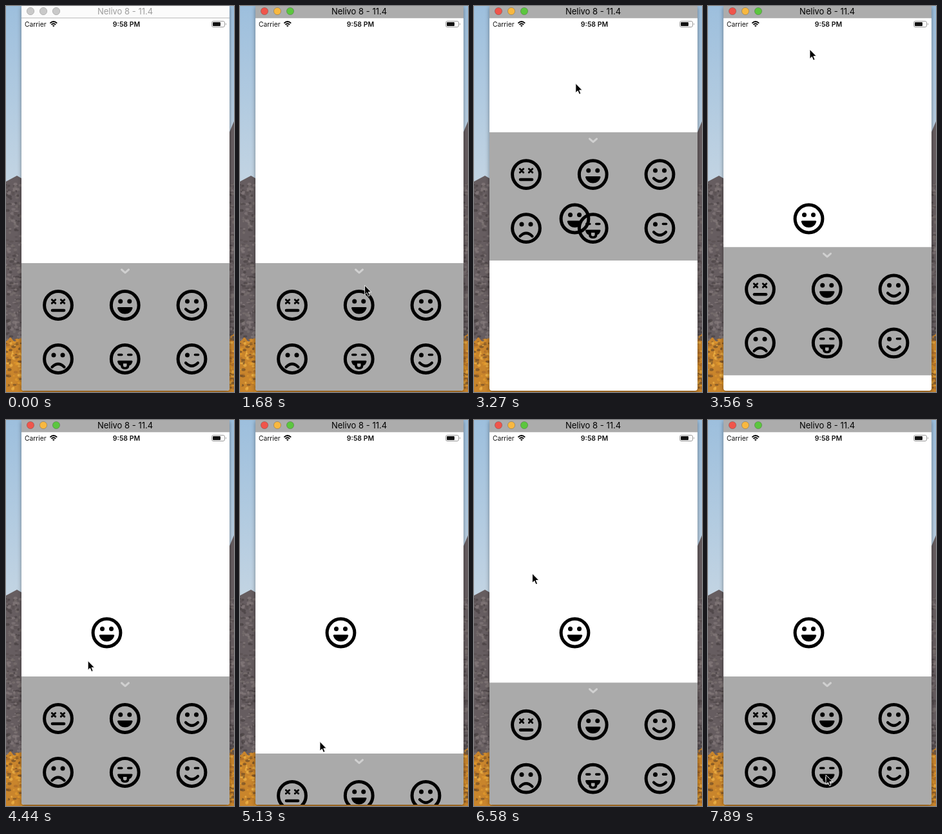
Write an HTML page that moves like this. It is 354 px wide and 596 px high and loops after 8 s.

```html
<!DOCTYPE html>
<html lang="en">
<head>
<meta charset="utf-8">
<title>Emoji tray</title>
<style>
  html, body { margin: 0; width: 100%; height: 100%; overflow: hidden; }
  svg { display: block; width: 354px; height: 596px; font-family: Inter, Roboto, sans-serif; }
  .line { fill: none; stroke: #000; stroke-linecap: round; stroke-linejoin: round; }
  #frame { filter: drop-shadow(0 2px 3px #0006); }
  .light { fill: #c9c9c9; stroke: #b4b4b4; }
  .bar { fill: #fbfbfb; }
  .title { fill: #9c9c9c; }
  .active .bar { fill: #acacac; }
  .active .title { fill: #000; }
  .active .light { fill: var(--c); stroke: #0003; }
</style>
</head>
<body>
<svg viewBox="0 0 354 596">
  <defs>
    <linearGradient id="sky" x2="0" y2="1">
      <stop stop-color="#9dbfdd"/><stop offset=".5" stop-color="#c6d6e3"/>
    </linearGradient>
    <clipPath id="screen"><path d="M24 19H347V590Q347 594 343 594H28Q24 594 24 590Z"/></clipPath>

    <circle id="ring" class="line" r="21.4" stroke-width="5"/>
    <g id="eyes"><circle cx="-7" cy="-6" r="3.5"/><circle cx="7" cy="-6" r="3.5"/></g>
    <path id="curve" class="line" stroke-width="4.2" d="M-9.5 6Q0 15.5 9.5 6"/>
    <g id="dead"><use href="#ring"/>
      <path class="line" stroke-width="2.9" d="M-9.7-8.5l5.4 5.4m0-5.4l-5.4 5.4M4.3-8.5l5.4 5.4m0-5.4l-5.4 5.4"/>
      <path class="line" stroke-width="4.6" d="M-9 8H9"/></g>
    <g id="grin"><use href="#ring"/><use href="#eyes"/>
      <path d="M-10.5 3H10.5Q12 3 11.7 4.5C10 10.5 5.5 13.5 0 13.5S-10 10.5-11.7 4.5Q-12 3-10.5 3Z"/></g>
    <g id="smile"><use href="#ring"/><use href="#eyes"/><use href="#curve"/></g>
    <g id="sad"><use href="#ring"/><use href="#eyes"/>
      <use href="#curve" transform="translate(0 18.5) scale(1 -1)"/></g>
    <g id="tongue"><use href="#ring"/>
      <path class="line" stroke-width="3.6" d="M-10-6.5H-5M5-6.5H10"/>
      <path fill-rule="evenodd" d="M-10.5 2.5H10.5Q12 2.5 11.7 4Q10.5 9 6.5 10.5V12Q5.5 16 0 16T-6.5 12V10.5Q-10.5 9-11.7 4Q-12 2.5-10.5 2.5ZM-2.8 7V11Q0 14 2.8 11V7Z"/></g>
    <g id="wink"><use href="#ring"/><use href="#curve"/>
      <circle cx="-7" cy="-6" r="3.5"/>
      <path class="line" stroke-width="3.6" d="M5-6.5H10"/></g>
  </defs>

  <rect width="354" height="596" fill="url(#sky)"/>
  <path fill="#665d60" d="M0 271L17 262 24 266 330 235 354 178V596H0Z"/>
  <path fill="#c9852c" d="M0 518L7 511 13 519 24 511H347L354 506V596H0Z"/>
  <g id="texture"></g>

  <g id="win">
    <path id="frame" fill="#fff" d="M24 0H347V590Q347 594 343 594H28Q24 594 24 590Z"/>
    <path class="bar" d="M24 0H347V18H24Z"/>
    <path fill="#bbb" d="M24 18H347V19H24Z"/>
    <circle class="light" style="--c:#f0554b" cx="38" cy="8" r="5.6"/>
    <circle class="light" style="--c:#f8b840" cx="58" cy="8" r="5.6"/>
    <circle class="light" style="--c:#5cc63f" cx="78" cy="8" r="5.6"/>
    <text class="title" x="185" y="13" font-size="13" text-anchor="middle">Nelivo 8 - 11.4</text>
  </g>

  <g fill="#111">
    <text x="29" y="31.6" font-size="10.3">Carrier</text>
    <text x="187" y="31.6" font-size="10.5" font-weight="600" text-anchor="middle">9:58 PM</text>
    <path class="line" stroke-width="1.9" style="stroke-linecap:butt" d="M68.4 26.6Q73.8 21.6 79.2 26.6M70.5 28.9Q73.8 25.8 77.1 28.9"/>
    <path d="M73.8 32.3L71.9 30.3Q73.8 28.9 75.7 30.3Z"/>
    <rect x="319.5" y="23.5" width="20" height="9" rx="2.4" fill="none" stroke="#999"/>
    <rect x="321" y="25" width="12" height="6" rx="1"/>
    <path fill="#999" d="M341 26.3Q343 28 341 29.7Z"/>
  </g>

  <g clip-path="url(#screen)">
    <g id="tray">
      <path fill="#aaa" d="M0 0H354V198H0Z"/>
      <path class="line" style="stroke:#d0d0d0" stroke-width="3" d="M179.5 10L185 14.8 190.5 10"/>
    </g>
    <use id="copy" href="#grin"/>
  </g>
  <path id="cursor" stroke="#fff" stroke-width=".9" d="M0 0V14.5L3.3 11.4 5.6 16.8 8 15.8 5.8 10.5H10.3Z"/>
</svg>

<script>
const LOOP = 8000;
const REST = 396;
const $ = id => document.getElementById(id);

function add(parent, tag, attrs) {
  const node = document.createElementNS("http://www.w3.org/2000/svg", tag);
  for (const name in attrs) node.setAttribute(name, attrs[name]);
  $(parent).append(node);
}

["dead", "grin", "smile", "sad", "tongue", "wink"].forEach((face, i) =>
  add("tray", "use", { href: "#" + face, x: 81 + 103.75 * (i % 3), y: 65 + 83 * Math.floor(i / 3) }));

// Rough rock and foliage along both edges of the desktop.
let seed = 7;
const random = () => (seed = seed * 16807 % 2147483647) / 2147483647;
const pick = list => list[Math.floor(random() * list.length)];
const rocks = ["#494243", "#5a5153", "#79706f", "#857b7c"];
const leaves = ["#6f4c26", "#a9692a", "#e39a2c", "#f0b347"];
for (let i = 0; i < 420; i++) {
  const y = 275 + random() * 320;
  add("texture", "ellipse", {
    cx: i % 3 ? random() * 24 : 347 + random() * 7, cy: y,
    rx: 1 + random() * 3, ry: 1 + random() * 1.5,
    fill: pick(y > 515 ? leaves : rocks), opacity: 0.7
  });
}

// Progress from 0 to 1 between two times, fast at first like a flick.
function ease(t, from, to) {
  const k = Math.min(1, Math.max(0, (t - from) / (to - from)));
  return 1 - (1 - k) ** 3;
}

// Each move: start, end, x, y.
const moves = [
  [350, 1050, 208, 403], [1230, 1680, 194, 430],
  [1680, 1745, 186, 458], [1745, 1910, 158, 318],
  [2380, 2860, 157, 405], [3160, 3400, 158, 67],
  [4020, 4790, 124, 403], [4840, 5630, 124, 528],
  [5690, 5930, 133.5, 569], [6350, 6580, 90.5, 237],
  [6700, 7140, 92, 393], [7190, 7530, 174, 546], [7710, 7890, 183, 548]
];

function cursorAt(t) {
  return moves.reduce(([x, y], [from, to, toX, toY]) => {
    const k = ease(t, from, to);
    return [x + (toX - x) * k, y + (toY - y) * k];
  }, [114, 242]);
}

function trayAt(t) {
  const flick = ease(t, 3160, 3270) - ease(t, 3270, 3840);
  const lowered = ease(t, 4840, 5630) - ease(t, 6350, 6730);
  return REST + (t < 3160) - 202 * flick + 159 * lowered;
}

function place(id, x, y, scale = 1) {
  $(id).setAttribute("transform", `translate(${x} ${y}) scale(${scale})`);
}

function show(id, visible) {
  $(id).style.display = visible ? "" : "none";
}

function draw(t) {
  const drag = ease(t, 1745, 1910), drop = ease(t, 2380, 2520);
  $("win").classList.toggle("active", t >= 1230);
  show("cursor", t >= 350);
  show("copy", t >= 1745);
  place("cursor", ...cursorAt(t));
  place("tray", 0, trayAt(t));
  place("copy", 185 - 28.5 * drag, 462 - 142 * drag + 8.5 * drop, 1 + (drag - drop) / 2);
}

const start = performance.now();
function tick() {
  draw((performance.now() - start) % LOOP);
  requestAnimationFrame(tick);
}
tick();
</script>
</body>
</html>
```
